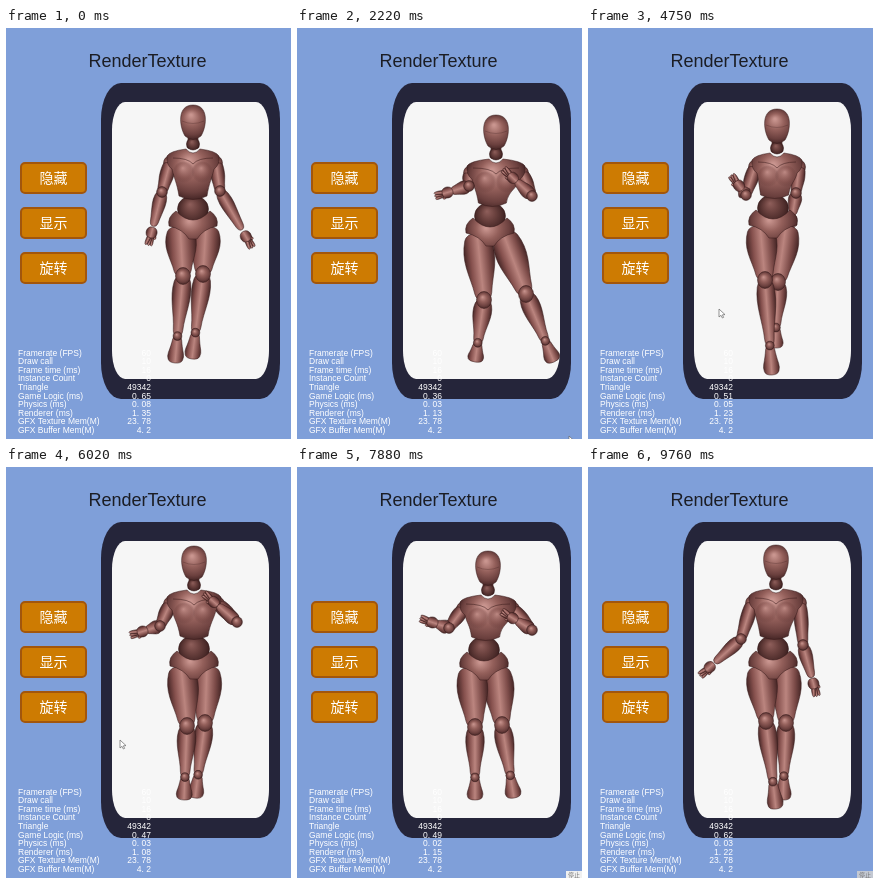
An HTML page with a canvas that plays this animation: 285 px wide and 411 px high, repeating every 9820 ms.

```html
<!DOCTYPE html>
<html lang="zh">
<head>
<meta charset="utf-8">
<title>RenderTexture</title>
<style>
html, body { margin: 0; width: 100%; height: 100%; overflow: hidden; background: #7f9fd9; }
body { position: relative; font-family: "Liberation Sans", Arial, sans-serif; }
body > * { position: absolute; }
h1 { margin: 0; left: 0; top: 23px; width: 283px; font: 18px/21px "Liberation Sans", Arial, sans-serif; text-align: center; color: #1b1d24; }
.phone { left: 95px; top: 55px; width: 179px; height: 316px; border-radius: 20px / 36px; background: #25253a; }
.screen { left: 106px; top: 74px; width: 157px; height: 277px; border-radius: 13px / 28px; background: #f6f6f6; }
.btn { left: 14px; width: 67px; height: 32px; box-sizing: border-box; border: 2px solid #a2560c; border-radius: 5px;
  background: #cd7b02; color: #fff; font: 500 14px/27px "Noto Sans CJK SC", "Noto Sans CJK", sans-serif; text-align: center; }
.stats { left: 12px; top: 320.6px; width: 133px; font-size: 8.5px; line-height: 8.6px; color: #fff; }
.stats div { display: flex; justify-content: space-between; white-space: pre; }
canvas { left: 0; top: 0; }
.tip { left: 269px; top: 404px; width: 16px; height: 7px; overflow: hidden; color: #777;
  font: 6px/7px "Noto Sans CJK SC", "Noto Sans CJK", sans-serif; text-align: center; }
</style>
</head>
<body>
<h1>RenderTexture</h1>
<div class="phone"></div>
<div class="screen"></div>
<div class="btn" style="top:134px">隐藏</div>
<div class="btn" style="top:179px">显示</div>
<div class="btn" style="top:224px">旋转</div>
<canvas width="285" height="411"></canvas>
<div class="stats"></div>
<div class="tip">停止</div>
<script>
const LOOP = 9820, STEPS = 126;
const ctx = document.querySelector('canvas').getContext('2d');
const tip = document.querySelector('.tip');

// chest x y, shoulder half width, pelvis x y, elbow+hand left/right, knee+toe left/right
const poses = {
  stride: [187,141,23,187,193, 156,164,146,203, 214,163,239,207, 177,248,169,335, 197,246,186,331],
  lunge:  [199,151,26,193,200, 172,158,152,164, 235,168,217,151, 187,272,178,334, 229,266,257,334],
  wide:   [180,149,25,171,198, 142,157,122,158, 210,168,189,146, 147,245,130,331, 187,245,191,334],
  cross:  [189,145,22,185,192, 158,167,152,159, 208,165,204,190, 177,252,184,347, 190,254,187,320],
  raise:  [188,143,24,188,194, 154,159,138,164, 231,155,209,136, 181,259,178,333, 199,256,189,331],
  stand:  [191,148,25,187,195, 152,161,137,156, 235,163,217,152, 178,260,178,333, 205,258,217,331],
  swing:  [188,142,24,185,194, 153,172,123,199, 215,178,225,215, 178,254,188,342, 198,256,195,333]
};
const dance = [[0,'stride'],[9,'swing'],[18,'raise'],[28,'lunge'],[38,'stand'],[48,'wide'],[61,'cross'],
  [69,'swing'],[77,'raise'],[89,'lunge'],[101,'stand'],[113,'wide'],[125,'swing']].map(([k, n]) => [k, poses[n]]);
const pointer = [[14,[272,408]],[40,[272,408]],[46,[130,279]],[61,[131,281]],[70,[103,284]],
  [77,[114,273]],[84,[74,300]],[92,[281,416]]];

// game logic, physics and renderer times, one set per second
const timings = ['0. 65|0. 08|1. 35', '0. 48|0. 04|1. 20', '0. 36|0. 03|1. 13', '0. 53|0. 05|1. 26', '0. 51|0. 05|1. 23',
  '0. 50|0. 04|1. 16', '0. 47|0. 03|1. 08', '0. 49|0. 02|1. 15', '0. 55|0. 04|1. 19', '0. 62|0. 03|1. 22'];
const labels = ['Framerate (FPS)', 'Draw call', 'Frame time (ms)', 'Instance Count', 'Triangle', 'Game Logic (ms)',
  'Physics (ms)', 'Renderer (ms)', 'GFX Texture Mem(M)', 'GFX Buffer Mem(M)'];
const fixed = ['60', '10', '16', '0', '49342', '', '', '', '23. 78', '4. 2'];
const stats = document.querySelector('.stats');
labels.forEach((label, i) => {
  const row = stats.appendChild(document.createElement('div'));
  for (const text of [label, fixed[i]]) row.appendChild(document.createElement('span')).textContent = text;
});
const values = [...stats.querySelectorAll('span:last-child')];

const mix = (a, b, u) => a + (b - a) * u;
const mixPt = (a, b, u) => [mix(a[0], b[0], u), mix(a[1], b[1], u)];

// Hermite curve through keyed vectors
function sample(keys, t, tension) {
  const last = keys.length - 1;
  let i = 0;
  while (i < last - 1 && t >= keys[i + 1][0]) i++;
  const [t0, a] = keys[i], [t1, b] = keys[i + 1];
  const [tp, p] = keys[Math.max(i - 1, 0)], [tn, n] = keys[Math.min(i + 2, last)];
  const d = t1 - t0, u = Math.min(1, Math.max(0, (t - t0) / d)), v = 1 - u;
  return a.map((x, j) => {
    const m0 = (b[j] - p[j]) / (t1 - tp) * d * tension;
    const m1 = (n[j] - x) / (tn - t0) * d * tension;
    return (1 + 2 * u) * v * v * x + u * v * v * m0 + u * u * (3 - 2 * u) * b[j] - u * u * v * m1;
  });
}

function paint(gradient) {
  ctx.fillStyle = gradient;
  ctx.fill();
  ctx.strokeStyle = 'rgba(52,24,24,.7)';
  ctx.lineWidth = 0.7;
  ctx.stroke();
}

function shade(gradient, stops) {
  stops.forEach(([at, color]) => gradient.addColorStop(at, color));
  return gradient;
}
const round = [[0, '#c9958f'], [0.4, '#94605b'], [0.75, '#6b403e'], [1, '#3b1f1f']];
const dark = [[0, '#8f5f5b'], [0.4, '#6d4340'], [0.8, '#4a2a29'], [1, '#341a1a']];
const across = [[0, '#432424'], [0.22, '#7d4c49'], [0.5, '#bb857f'], [0.78, '#85504d'], [1, '#432424']];

function ball([x, y], rx, ry = rx, tones = round) {
  ctx.beginPath();
  ctx.ellipse(x, y, rx, ry, 0, 0, 7);
  const r = Math.max(rx, ry);
  paint(shade(ctx.createRadialGradient(x - rx * 0.2, y - ry * 0.35, 0, x, y, r * 1.08), tones));
}

// tapered limb; half widths are spread evenly from a to b
function limb(a, b, widths) {
  const dx = b[0] - a[0], dy = b[1] - a[1], len = Math.hypot(dx, dy), n = widths.length - 1;
  const side = widths.map((w, i) => [len * i / n, w]);
  const pts = [...side, ...side.map(([x, w]) => [x, -w]).reverse()];
  const w = Math.max(...widths);
  ctx.save();
  ctx.translate(...a);
  ctx.rotate(Math.atan2(dy, dx));
  ctx.beginPath();
  ctx.moveTo(...mixPt(pts[pts.length - 1], pts[0], 0.5));
  pts.forEach((p, i) => ctx.quadraticCurveTo(...p, ...mixPt(p, pts[(i + 1) % pts.length], 0.5)));
  ctx.closePath();
  paint(shade(ctx.createLinearGradient(0, -w, 0, w), across));
  ctx.restore();
}

function upperArm(shoulder, elbow) {
  ball(shoulder, 6.5, 7);
  limb(shoulder, elbow, [6, 7, 7, 5.5, 5]);
}

function forearm(elbow, hand) {
  const dir = Math.atan2(hand[1] - elbow[1], hand[0] - elbow[0]);
  const away = (turn, reach) => [hand[0] + Math.cos(dir + turn) * reach, hand[1] + Math.sin(dir + turn) * reach];
  limb(elbow, mixPt(elbow, hand, 0.88), [5, 7, 6, 4.5, 3.5]);
  ball(elbow, 5.4);
  for (const turn of [-0.6, -0.2, 0, 0.2]) limb(hand, away(turn, turn < -0.5 ? 9 : 15), [2, 2, 2, 1]);
  limb(away(Math.PI, 4), away(0, 7), [3, 5.5, 5.5, 3.5]);
}

function leg(hip, knee, toe) {
  const ankle = mixPt(toe, knee, 0.31);
  limb(hip, knee, [11, 15, 15.5, 13, 9.5, 7.5]);
  limb(ankle, toe, [4, 5, 6.5, 8.5, 6]);
  limb(knee, ankle, [7, 9.5, 9, 7, 5, 4.5]);
  ball(ankle, 4.4);
  ball(knee, 7.5, 8.5);
}

function pelvis(x, y) {
  ball([x, y - 12], 15.5, 13.5, dark);
  ctx.beginPath();
  ctx.moveTo(x - 17, y - 10);
  ctx.quadraticCurveTo(x, y + 8, x + 17, y - 10);
  ctx.quadraticCurveTo(x + 26, y - 4, x + 24, y + 5);
  ctx.quadraticCurveTo(x + 10, y + 8, x + 4, y + 18);
  ctx.lineTo(x - 4, y + 18);
  ctx.quadraticCurveTo(x - 10, y + 8, x - 24, y + 5);
  ctx.quadraticCurveTo(x - 26, y - 4, x - 17, y - 10);
  paint(shade(ctx.createRadialGradient(x - 4, y, 1, x, y, 27), round));
}

function torso(x, y, half, wx, wy) {
  limb([x, y - 33], [x, y - 20], [5, 5, 6, 6]);
  ball([x, y - 25], 6.5, 6, dark);
  ctx.beginPath();
  ctx.moveTo(x - 7, y - 20);
  ctx.quadraticCurveTo(x - half, y - 18, x - half - 3, y - 13);
  ctx.quadraticCurveTo(x - half - 4, y - 4, x - half + 2, y);
  ctx.bezierCurveTo(x - half + 4, y + 9, wx - 16, wy - 13, wx - 14, wy);
  ctx.quadraticCurveTo(wx, wy + 7, wx + 14, wy);
  ctx.bezierCurveTo(wx + 16, wy - 13, x + half - 4, y + 9, x + half - 2, y);
  ctx.quadraticCurveTo(x + half + 4, y - 4, x + half + 3, y - 13);
  ctx.quadraticCurveTo(x + half, y - 18, x + 7, y - 20);
  ctx.quadraticCurveTo(x, y - 12, x - 7, y - 20);
  paint(shade(ctx.createRadialGradient(x - 4, y - 8, 2, x, y, 33), round));
  for (const s of [-1, 1]) {
    const bx = x + s * half * 0.4, by = y + 3;
    ctx.fillStyle = shade(ctx.createRadialGradient(bx - 1, by - 4, 0, bx, by, 11),
      [[0, 'rgba(206,154,148,.65)'], [0.7, 'rgba(120,70,67,.35)'], [1, 'rgba(70,36,36,0)']]);
    ctx.beginPath();
    ctx.arc(bx, by, 11, 0, 7);
    ctx.fill();
  }
  ctx.beginPath();
  ctx.moveTo(x - half + 3, y - 11);
  ctx.quadraticCurveTo(x - 5, y - 11, x, y - 5);
  ctx.quadraticCurveTo(x + 5, y - 11, x + half - 3, y - 11);
  ctx.stroke();
}

function head(x, y) {
  ctx.beginPath();
  ctx.moveTo(x, y - 17);
  ctx.bezierCurveTo(x + 16, y - 17, x + 14, y + 4, x + 8, y + 14);
  ctx.quadraticCurveTo(x, y + 21, x - 8, y + 14);
  ctx.bezierCurveTo(x - 14, y + 4, x - 16, y - 17, x, y - 17);
  paint(shade(ctx.createRadialGradient(x - 2, y - 7, 1, x, y, 19), round));
  ctx.beginPath();
  ctx.moveTo(x - 11, y - 1);
  ctx.quadraticCurveTo(x, y + 4, x + 11, y - 1);
  ctx.strokeStyle = 'rgba(52,24,24,.35)';
  ctx.stroke();
}

function mannequin(pose) {
  const [cx, cy, half, px, py, ...rest] = pose;
  const [elbowL, handL, elbowR, handR, kneeL, toeL, kneeR, toeR] =
    Array.from({ length: 8 }, (_, i) => rest.slice(i * 2, i * 2 + 2));
  const legs = [[[px - 13, py + 5], kneeL, toeL], [[px + 13, py + 5], kneeR, toeR]];
  const lower = [[elbowL, handL], [elbowR, handR]];
  const hangs = ([, hand]) => hand[1] > cy + 35;
  upperArm([cx - half, cy - 6], elbowL);
  upperArm([cx + half, cy - 6], elbowR);
  lower.filter(hangs).forEach(a => forearm(...a));
  legs.sort((a, b) => a[2][1] - b[2][1]).forEach(l => leg(...l));
  pelvis(px, py);
  torso(cx, cy, half, mix(px, cx, 0.4), py - 25);
  head(cx, cy - 47);
  lower.filter(a => !hangs(a)).forEach(a => forearm(...a));
}

function cursor([x, y]) {
  ctx.beginPath();
  [[0, 0], [0, 8], [2, 6.3], [3.4, 9], [4.6, 8.4], [3.4, 5.8], [6, 5.6]].forEach(([dx, dy]) => ctx.lineTo(x + dx, y + dy));
  ctx.closePath();
  ctx.fillStyle = '#fff';
  ctx.fill();
  ctx.strokeStyle = '#666';
  ctx.lineWidth = 0.7;
  ctx.stroke();
}

function draw(now) {
  const t = now % LOOP;
  const step = Math.min(STEPS - 1, Math.floor(t / LOOP * STEPS + 0.2));
  ctx.clearRect(0, 0, 285, 411);
  ctx.save();
  ctx.beginPath();
  ctx.rect(106, 74, 157, 277);
  ctx.clip();
  mannequin(sample(dance, step, 0.7));
  ctx.restore();
  if (step >= 14 && step < 92) cursor(sample(pointer, step, 0));
  tip.style.display = step >= 96 ? 'block' : 'none';
  tip.style.background = step < 118 ? '#f0f0f0' : '#c3c8d2';
  timings[Math.floor(t / 1000)].split('|').forEach((text, i) => {
    if (values[5 + i].textContent !== text) values[5 + i].textContent = text;
  });
  requestAnimationFrame(() => draw(performance.now() - start));
}
const start = performance.now();
draw(0);
</script>
</body>
</html>
```
